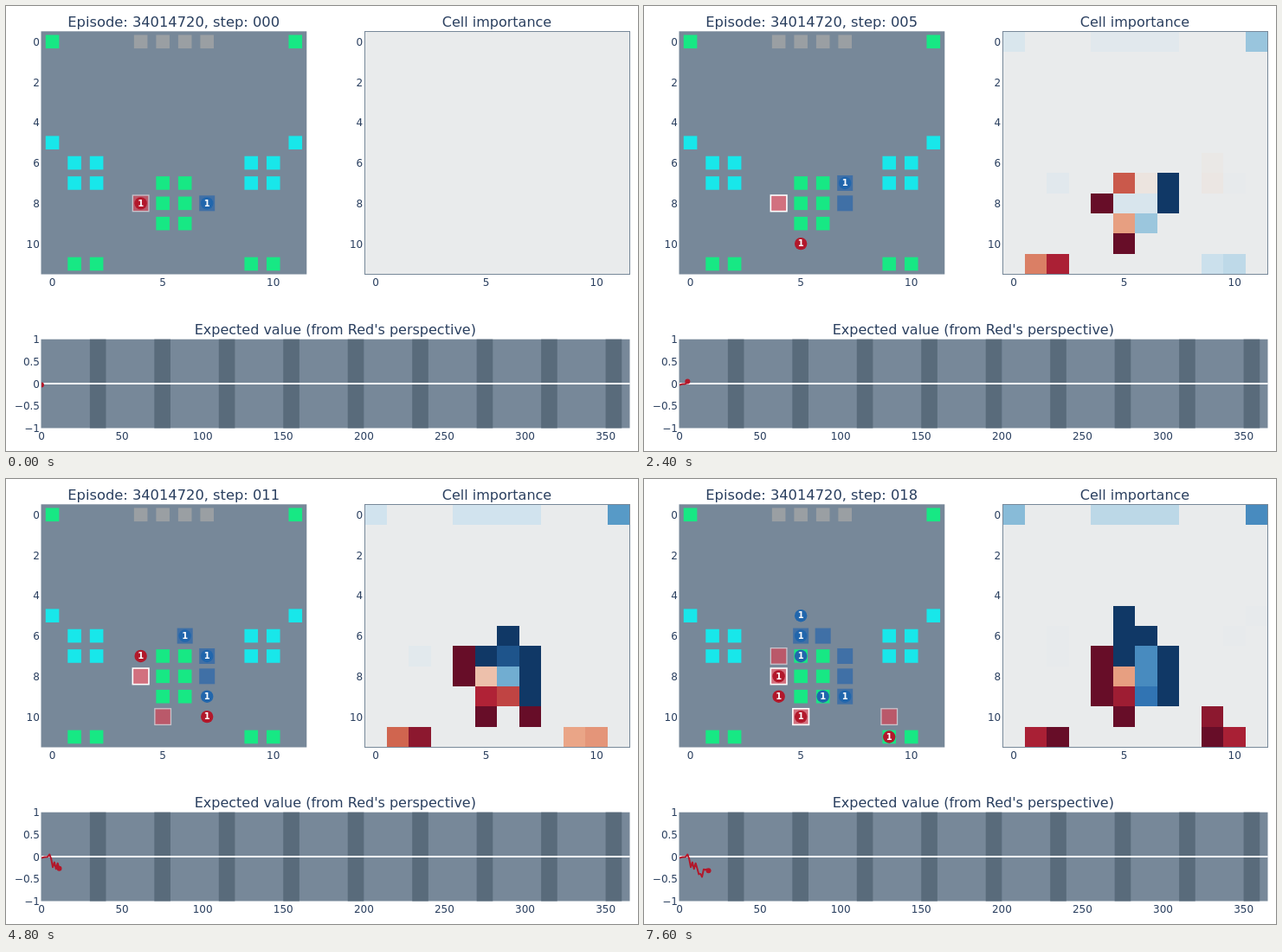
Write an HTML page that moves like this. It is 730x515 px and loops after 8 s.

```html
<!DOCTYPE html>
<html lang="en">
<head>
<meta charset="utf-8">
<title>Episode replay</title>
<style>
html, body { margin: 0; width: 100%; height: 100%; overflow: hidden; background: #fff; }
svg { display: block; }
text { font: 12px "DejaVu Sans", Verdana, sans-serif; fill: #2a3f5f; text-anchor: middle; }
text.title { font-size: 16px; }
text.y { text-anchor: end; }
text.unit { font-size: 10px; font-weight: bold; fill: #fff; }
</style>
</head>
<body>
<svg width="730" height="515" viewBox="0 0 730 515">
  <defs><clipPath id="plot"><rect x="41" y="386" width="679.5" height="102.5"/></clipPath></defs>
  <g id="base"></g>
  <g id="heat" shape-rendering="crispEdges"></g>
  <rect x="414.5" y="29.5" width="306" height="281" fill="none" stroke="#778899"/>
  <g id="board"></g>
  <g id="curve" clip-path="url(#plot)"></g>
  <text id="episode" class="title" x="193.7" y="24" style="font-size:16.3px"></text>
</svg>
<script>
const STEP_MS = 400, LOOP_MS = 8000;
const CELL_W = 25.52, CELL_H = 23.38, TOP = 29.6, LEFT = 40.8, HEAT_LEFT = 414.2;
const $ = id => document.getElementById(id);
const rect = (x, y, w, h, fill, more = '') =>
  `<rect x="${x}" y="${y}" width="${w}" height="${h}" fill="${fill}" ${more}/>`;
const label = (x, y, text, cls = '') => `<text x="${x}" y="${y}" class="${cls}">${text}</text>`;
const colX = c => LEFT + (c + .5) * CELL_W;
const rowY = r => TOP + (r + .5) * CELL_H;
const cells = list => list.split(' ').map(s => s.split(',').map(Number));
const square = (c, r, size, fill, more) =>
  rect(colX(c) - size / 2, rowY(r) - size / 2, size, size, fill, more);

const resources = [
  ['#17e884', '0,0 11,0 5,7 6,7 5,8 6,8 5,9 6,9 1,11 2,11 9,11 10,11'],
  ['#18e7ea', '0,5 11,5 1,6 2,6 9,6 10,6 1,7 2,7 9,7 10,7'],
  ['#9a9fa3', '4,0 5,0 6,0 7,0']
];

// at: cell, from: first step, lit: step ranges with a bright outline
const cities = [
  { team: 'red', at: [4, 8], from: 0, lit: [[5, 99]] },
  { team: 'red', at: [5, 10], from: 7, lit: [[7, 8], [14, 99]] },
  { team: 'red', at: [4, 7], from: 14, lit: [] },
  { team: 'red', at: [9, 10], from: 16, lit: [] },
  { team: 'blue', at: [7, 8], from: 0 },
  { team: 'blue', at: [7, 7], from: 5 },
  { team: 'blue', at: [6, 6], from: 11 },
  { team: 'blue', at: [7, 9], from: 13 },
  { team: 'blue', at: [5, 6], from: 16 }
];

// path: [step, column, row]
const units = [
  { team: 'red', path: [[0, 4, 8], [1, 4, 9], [3, 5, 9], [5, 5, 10], [9, 6, 10], [11, 7, 10], [13, 8, 10], [15, 9, 10], [17, 9, 11]] },
  { team: 'red', path: [[8, 4, 8], [10, 4, 7], [15, 4, 8], [17, 4, 9]] },
  { team: 'red', path: [[14, 5, 10]] },
  { team: 'red', path: [[17, 4, 8]] },
  { team: 'blue', path: [[0, 7, 8], [1, 7, 7], [7, 6, 7], [9, 6, 6], [13, 5, 6], [17, 5, 5]] },
  { team: 'blue', path: [[7, 7, 8], [9, 7, 9], [15, 6, 9]] },
  { team: 'blue', path: [[11, 7, 7], [13, 6, 7], [15, 5, 7]] },
  { team: 'blue', path: [[14, 7, 9]] },
  { team: 'blue', path: [[17, 5, 6]] }
];

// Importance of cells without units, -1 (blue) to 1 (red), blended between steps
const ROW0 = '4,0 5,0 6,0 7,0';
const importance = Object.entries({
  3: { '-.03': '0,0 2,7 10,7 ' + ROW0, '-.4': '11,0 5,8 6,8', '.48': '1,11', '.75': '2,11',
       '-.36': '9,11 10,11', '.27': '5,7', '.17': '6,7', '-1': '6,9', '.04': '9,7' },
  7: { '-.24': '0,0 10,11', '-.1': '2,7 9,11 ' + ROW0, '-.49': '11,0', '1': '5,7',
       '.12': '5,8 6,8 6,9', '.84': '5,9', '.56': '1,11', '.88': '2,11', '.08': '9,6 9,7' },
  11: { '-.2': '0,0 ' + ROW0, '-.63': '11,0', '-.06': '2,7', '-1': '5,7', '-.9': '6,7', '.3': '5,8',
        '-.55': '6,8', '.8': '5,9', '.7': '6,9', '.6': '1,11', '.9': '2,11', '.4': '9,11', '.45': '10,11' },
  13: { '-.14': '0,0 2,7 ' + ROW0, '-.59': '11,0', '-.1': '5,7', '.31': '5,8', '-.36': '6,8', '.83': '5,9',
        '.4': '6,9', '.5': '1,11', '.78': '2,11', '.91': '9,11', '.68': '10,11', '-.03': '1,6 2,6 1,7', '.03': '9,7' },
  15: { '-.23': '0,0 ' + ROW0, '-.59': '11,0', '-1': '6,7', '-.05': '5,8', '-.73': '6,8', '.9': '5,9',
        '.67': '1,11', '1': '2,11 9,11', '.92': '10,11', '.1': '9,7', '-.02': '0,5 11,5 1,6 2,6 1,7' },
  18: { '-.49': '0,0', '-.31': ROW0, '-.69': '11,0 6,7 6,8', '.42': '5,8', '.85': '5,9', '-.78': '6,9',
        '.9': '9,10', '.82': '1,11 10,11', '1': '2,11 9,11', '-.02': '11,5 10,6 2,6 2,7' }
}).map(([step, groups]) => {
  const map = {};
  for (const value in groups) for (const key of groups[value].split(' ')) map[key] = +value;
  return { step: +step, map };
});

const scale = ['#103866', '#2c6fb0', '#5ea2cb', '#aacfe2', '#d1e3ee', '#e9ebec',
  '#f0dace', '#eaa587', '#d0654f', '#b02236', '#670d28']
  .map(hex => [1, 3, 5].map(i => parseInt(hex.slice(i, i + 2), 16)));

function scaleColor(value) {
  const pos = (value + 1) * 5, i = Math.min(9, Math.floor(pos)), f = pos - i;
  return `rgb(${scale[i].map((v, k) => Math.round(v + (scale[i + 1][k] - v) * f))})`;
}

function unitCell(unit, step) {
  const stop = unit.path.filter(p => p[0] <= step).pop();
  return stop && stop.slice(1);
}

function drawHeat(step) {
  let out = rect(HEAT_LEFT, TOP, 12 * CELL_W, 12 * CELL_H, scaleColor(0));
  if (step > 0) {
    const next = importance.find(k => k.step >= step);
    const prev = importance.filter(k => k.step <= step).pop() || next;
    const f = next === prev ? 0 : (step - prev.step) / (next.step - prev.step);
    const values = {};
    for (const key of Object.keys({ ...prev.map, ...next.map })) {
      const a = prev.map[key] || 0;
      values[key] = a + ((next.map[key] || 0) - a) * f;
    }
    const occupy = (team, cell) => {
      const key = String(cell);
      if (next.step !== step || !(key in next.map)) values[key] = team === 'red' ? 1 : -1;
    };
    cities.filter(c => c.from <= step).forEach(c => occupy(c.team, c.at));
    units.forEach(u => { const cell = unitCell(u, step); if (cell) occupy(u.team, cell); });
    for (const key in values) {
      const [c, r] = key.split(',').map(Number);
      out += rect(HEAT_LEFT + c * CELL_W, TOP + r * CELL_H, CELL_W, CELL_H, scaleColor(values[key]));
    }
  }
  $('heat').innerHTML = out;
}

function drawBoard(step) {
  let out = '';
  for (const { team, at, from, lit } of cities) {
    if (from > step) continue;
    if (team === 'blue') { out += square(...at, 18, '#4070a6'); continue; }
    const bright = lit.some(([a, b]) => step >= a && step <= b);
    out += square(...at, 18.6, bright ? '#d2717f' : '#ba596a',
      bright ? 'stroke="#fff" stroke-width="1.6"' : 'stroke="#c9c4cc" stroke-width="1.3"');
  }
  for (const unit of units) {
    const cell = unitCell(unit, step);
    if (!cell) continue;
    const x = colX(cell[0]), y = rowY(cell[1]);
    out += `<circle cx="${x}" cy="${y}" r="7.2" fill="${unit.team === 'red' ? '#b2182b' : '#2166ac'}"/>`
      + label(x, y + 3.3, 1, 'unit');
  }
  $('board').innerHTML = out;
}

const expected = [-.03, -.02, -.01, -.01, 0, .05, -.05, -.24, -.13, -.28, -.15, -.27, -.4, -.39, -.46, -.29, -.3, -.29, -.32];
const PER_STEP = 1.8617;
function drawCurve(step) {
  const points = expected.slice(0, step + 1).map((v, i) => [41 + i * PER_STEP, 437 - v * 51]);
  const [x, y] = points[step];
  $('curve').innerHTML =
    `<polyline points="${points.join(' ')}" fill="none" stroke="#b2182b" stroke-width="2" stroke-linejoin="round"/>`
    + `<circle cx="${x}" cy="${y}" r="3" fill="#b2182b"/>`;
}

function drawBase() {
  let out = rect(40.5, 29.3, 306.8, 281.2, '#778899') + rect(40.5, 385.7, 680, 102.8, '#778899');
  for (const [fill, list] of resources)
    for (const [c, r] of cells(list)) out += square(c, r, 15.6, fill);
  for (let s = 30; s < 360; s += 40)
    out += rect(41 + s * PER_STEP, 385.7, 10 * PER_STEP, 102.8, '#596b7b');
  out += rect(41, 436, 679.5, 2, '#fff');
  for (const shift of [0, HEAT_LEFT - LEFT]) {
    for (let r = 0; r <= 10; r += 2) out += label(38.8 + shift, rowY(r) + 4.5, r, 'y');
    for (let c = 0; c <= 10; c += 5) out += label(colX(c) + shift, 324, c);
  }
  ['1', '0.5', '0', '−0.5', '−1'].forEach((t, i) => out += label(39, 390.3 + i * 25.6, t, 'y'));
  for (let s = 0; s <= 350; s += 50) out += label(41 + s * PER_STEP, 502, s);
  out += label(567, 24, 'Cell importance', 'title')
    + label(380.3, 380, "Expected value (from Red's perspective)", 'title');
  $('base').innerHTML = out;
}

let shown = -1;
const start = performance.now();
function frame(now) {
  const t = Math.max(0, now - start) % LOOP_MS;
  const step = Math.max(0, Math.floor(t / STEP_MS) - 1);
  if (step !== shown) {
    shown = step;
    $('episode').textContent = `Episode: 34014720, step: ${String(step).padStart(3, '0')}`;
    drawHeat(step);
    drawBoard(step);
    drawCurve(step);
  }
  requestAnimationFrame(frame);
}
drawBase();
frame(start);
</script>
</body>
</html>
```
